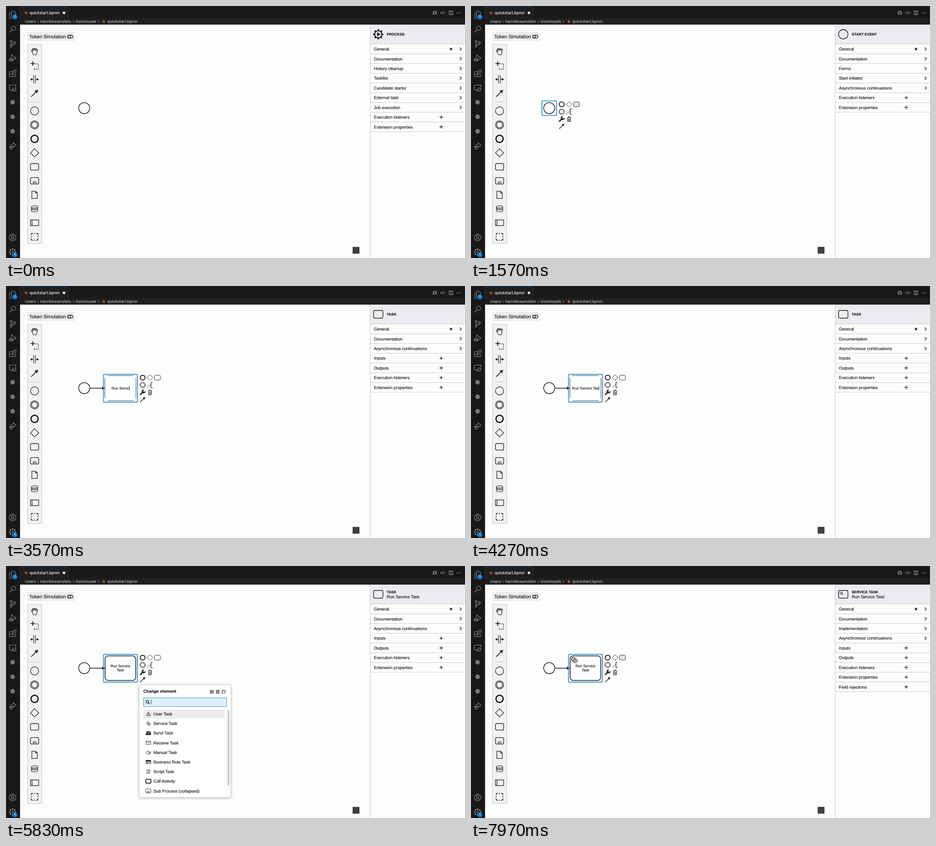
These frames come from a looping animation (1009x555 px, 8000 ms). An HTML page:

```html
<!DOCTYPE html>
<html lang="en">
<head>
<meta charset="utf-8">
<title>Process modeler</title>
<style>
html, body { margin: 0; width: 100%; height: 100%; overflow: hidden; background: #fdfdfb; }
svg { display: block; width: 1009px; height: 555px; }
text { font-family: "Liberation Sans", Arial, sans-serif; white-space: pre; text-rendering: geometricPrecision; }
.code text { font-family: Inter, "Open Sans", sans-serif; }
</style>
</head>
<body>
<svg id="stage" viewBox="0 0 1009 555" xmlns="http://www.w3.org/2000/svg"></svg>
<script>
const INK = '#1b1b1d', BLUE = '#1a86d6', GRAY = '#8a8a8a';
const LOOP = 8000;

// Drawing helpers, all returning SVG markup
const path = (d, w = 1.3, color = INK, fill = 'none', extra = '') =>
  `<path d="${d}" fill="${fill}" stroke="${color}" stroke-width="${w}" ${extra}/>`;
const solid = (d, color = INK) => `<path d="${d}" fill="${color}"/>`;
const circle = (x, y, r, w = 1.3, color = INK, fill = 'none', extra = '') =>
  `<circle cx="${x}" cy="${y}" r="${r}" fill="${fill}" stroke="${color}" stroke-width="${w}" ${extra}/>`;
const dot = (x, y, r, color) => `<circle cx="${x}" cy="${y}" r="${r}" fill="${color}"/>`;
const box = (x, y, w, h, fill, stroke = 'none', sw = 1, r = 0, extra = '') =>
  `<rect x="${x}" y="${y}" width="${w}" height="${h}" rx="${r}" fill="${fill}" stroke="${stroke}" stroke-width="${sw}" ${extra}/>`;
const text = (s, x, cy, size, color = '#111', extra = '') =>
  `<text x="${x}" y="${cy + size * 0.35}" font-size="${size}" fill="${color}" stroke="${color}" stroke-width=".15" ${extra}>${s}</text>`;
const at = (x, y, body, scale = 1) => `<g transform="translate(${x} ${y}) scale(${scale})">${body}</g>`;
const gear = (r, color, w = 1.2) =>
  circle(0, 0, r * 0.72, w, color) +
  circle(0, 0, r * 0.88, r * 0.24, color, 'none',
    `stroke-dasharray="${r * 0.346}" stroke-dashoffset="${r * 0.17}"`);

// Small shapes centred on 0,0
const icon = {
  hand: path('M-4.5 3L-7 -1q-.8-1.7.8-1.5L-4 0-5-5q0-1.6 1.4-1L-2-2-1.8-6.5q.8-1.6 1.8 0L.3-2 1.8-6q1.2-1.1 1.7.3L2.8-1.2 5-4.3q1.4-.8 1.6.7L4.8 3 3.5 7.5h-6z', 1.1),
  lasso: path('M-4-9V1M-9-4H1', 1.8) + path('M-.5 8.5V4M-.5 8.5H8.5V-3.5H2', 1.2, INK, 'none', 'stroke-dasharray="2.6 1.8"'),
  space: path('M-2-9V9M2-9V9', 1.2) + path('M-8 0H-3M8 0H3', 1.5) + solid('M-9.5 0l4-3.2v6.4zM9.5 0l-4-3.2v6.4z'),
  connect: path('M-7.5 7.5L4-4', 1.7) + solid('M8-8L5.6.2-.2-5.6z'),
  start: circle(0, 0, 9, 1.3),
  middle: circle(0, 0, 9, 1.3) + circle(0, 0, 6.6, 1.3),
  end: circle(0, 0, 7.9, 2.8),
  gateway: path('M0-9L9 0 0 9-9 0z'),
  task: box(-9, -7.2, 18, 14.4, 'none', INK, 1.3, 3),
  sub: box(-9, -7.2, 18, 14.4, 'none', INK, 1.3, 3) + path('M-3.2 7V1.8H3.2V7M-1.6 4.5H1.6', 1),
  doc: path('M-6-8H2L6-4V8H-6zM2-8V-4H6'),
  store: path('M-7-4.3V4.3C-7 7.4 7 7.4 7 4.3V-4.3C7-7.4-7-7.4-7-4.3C-7-1.4 7-1.4 7-4.3M-7-1.9C-7 1 7 1 7-1.9M-7 .5C-7 3.4 7 3.4 7 .5', 1.1),
  pool: box(-9, -6.2, 18, 12.4, 'none', INK, 1.3) + path('M-5.5-6V6', 1.3),
  group: path('M-7.5-3.5V-5Q-7.5-7.5-5-7.5H-3.5M3.5-7.5H5Q7.5-7.5 7.5-5V-3.5M7.5 3.5V5Q7.5 7.5 5 7.5H3.5M-3.5 7.5H-5Q-7.5 7.5-7.5 5V3.5M-1.2-7.5H1.2M-1.2 7.5H1.2M-7.5-1.2V1.2M7.5-1.2V1.2', 1.4),
  wrench: path('M-4.8 4.8L1.5-1.5', 2.8, INK, 'none', 'stroke-linecap="round"') +
    path('M2.2-5.5a3.3 3.3 0 1 0 3.3 3.3', 2.2),
  trash: path('M-4-3.2H4M-1.4-3.4V-5H1.4V-3.4M-3.4-3L-3 5.5H3L3.4-3M-1.1-1V4M1.1-1V4', 1.1),
  note: path('M6-6H2.2V6H6', 1.2) + path('M-6 5.5L1.5-1', 1.3, INK, 'none', 'stroke-dasharray="1.6 1.3"'),
  magnifier: circle(-1, -1, 2.9, 1.3) + path('M1.2 1.2L4.3 4.3', 1.6),
  user: circle(0, -2.2, 1.8, .9) + path('M-4 4V1.6Q-3.4 0-1.4 0H1.4Q3.4 0 4 1.6V4zM-2 4V2M2 4V2', .9),
  service: at(-1.2, -1, gear(3.3, INK, .8)) + at(1.4, 1.3, circle(0, 0, 2.7, 1, INK, '#fff') + dot(0, 0, 1, INK)),
  send: solid('M-5.5-3.8H5.5L0 .3zM-5.5-2.6L0 1.6 5.5-2.6V4H-5.5z'),
  receive: path('M-5-3.6H5V3.6H-5zM-5-3.6L0 .7 5-3.6', .9),
  manual: path('M-5-1.2L-1.5-3.5Q.5-3.6-.5-1.6H4.5Q5.4-.6 4.5 0H5Q5.6 1 4.6 1.6 5 2.6 4 3.4H-3.5L-5 2.4zM.5 0H4.5M.5 1.6H4.4', .8),
  rule: path('M-5.2-3.6H5.2V3.6H-5.2zM-5.2 1H5.2M-2-1V3.6', .9) + solid('M-5.6-4H5.6V-1H-5.6z'),
  script: path('M-2-4H4Q1.4-2 3 0T1.8 4H-4Q-1.4 2-3 0T-2-4M-1.5-1.5H1.5M-1 1.6H2', .9),
  call: box(-5.6, -4.4, 11.2, 8.8, 'none', INK, 1.7, 2),
  collapsed: box(-5.6, -4.4, 11.2, 8.8, 'none', INK, .9, 1.6) + path('M-2 4V.8H2V4M-1 2.5H1', .8)
};

function workbench() {
  const line = (d, w = 1.1) => path(d, w, GRAY);
  const badge = y => dot(19.5, y, 5.6, '#0a74cf') +
    text('1', 19.5, y, 7, '#fff', 'text-anchor="middle"');
  const activity =
    at(14.5, 19, line('M-2.5-7.5H3L6.5-4V4H-2.5zM-2.5-3.5H-6.5V8H2.5V4')) + badge(24) +
    at(14.5, 51, circle(2, -2, 4.7, 1.2, GRAY) + line('M-1.5 1.5L-7 7.3', 1.3)) +
    at(14.5, 83, circle(-3.2, -5, 2.1, 1.1, GRAY) + circle(-3.2, 5.4, 2.1, 1.1, GRAY) +
      circle(4, -2, 2.1, 1.1, GRAY) + line('M-3.2-3V3.3M4 .2Q4 2.4 1 2.4H-1Q-3 2.4-3.2 3.4')) +
    at(14.5, 115, line('M-2-2V-7.5L7.5 0-.5 5.2') + circle(-3.5, 3, 3, 1.1, GRAY) + line('M-8 1h2M-8 6l2-1M-1 1h2M-1 5l2 1M-6.5 3h6')) +
    at(14.5, 148, line('M-7-3.5H0V7.5H-7zM0 2H6.5V7.5H0M-7 2H0M2.3-7H7.3V-2H2.3z')) +
    at(14.5, 180, line('M0 4.5H-7V-6H7V-1M-4 7H0') + circle(4, 4, 3.5, 1.1, GRAY) + line('M2.3 4l1.3 1.3L6 2.8', .9)) +
    [212, 244, 276].map(y => dot(14.5, y, 5, '#777')).join('') +
    at(14.5, 308, line('M1-6.8L7.5-1.5 1 3.5V.7Q-4 .5-6.6 4.5-6-3 1-4z') + circle(-3, 5, 2.3, 1.1, GRAY)) +
    at(14.5, 510, circle(0, 0, 7.4, 1.1, GRAY) + circle(0, -2, 2.8, 1.1, GRAY) + line('M-5 5.4Q0-1 5 5.4')) +
    at(14.5, 542, gear(8, GRAY) + circle(0, 0, 2.2, 1, GRAY)) + badge(548);
  const tools = at(942.5, 15, path('M-2.5-2V2.5Q0 5 2.5 2.5V-2zM-2-2.5Q0-5 2-2.5M-4.5-3.5L-2.5-2M4.5-3.5L2.5-2M-5 .8h2.5M5 .8H2.5M-4.5 4L-2.5 2.5M4.5 4L2.5 2.5', .9, '#c4c4c4')) +
    at(960, 15, path('M-2.5-2.5L-5 0-2.5 2.5M2.5-2.5L5 0 2.5 2.5M1-3.5L-1 3.5', .9, '#c4c4c4')) +
    at(978, 15, path('M-4-4H4V4H-4zM0-4V4', .9, '#c4c4c4')) +
    [-3, 0, 3].map(d => dot(995 + d, 15, .8, '#c4c4c4')).join('');
  const crumb = (s, x) => text(s, x, 34, 8.6, '#b0b0b0');
  const arrow = x => path(`M${x - 1.2} 31.5l2.4 2.5-2.4 2.5`, .9, '#b0b0b0');
  return '<g class="code">' +
    box(0, 0, 1009, 41, '#18181a') + box(0, 0, 31, 555, '#18181a') +
    box(31, 26, 978, 15, '#1f1f20') + box(31, 3, 107, 23, '#1f1f20') +
    box(31, 2, 107, 1, '#103f68') + box(30, 3, 1, 552, '#2b2b2b') + box(137.5, 3, .8, 23, '#2b2b2b') +
    activity + tools +
    dot(44, 15, 2.6, '#c8552b') + text('quickstart.bpmn', 52, 14.5, 8.6, '#f2f2f2') + dot(127.5, 15, 2.8, '#f2f2f2') +
    crumb('Users', 42) + arrow(70.5) + crumb('henrikbaumstein', 75.5) + arrow(148) +
    crumb('Downloads', 153) + arrow(203) + dot(215, 34, 2.6, '#c8552b') + crumb('quickstart.bpmn', 223) +
    '</g>';
}

function editor() {
  const tools = ['hand', 'lasso', 'space', 'connect', 'start', 'middle', 'end', 'gateway',
    'task', 'sub', 'doc', 'store', 'pool', 'group'];
  const palette = tools.map((name, i) =>
    at(62.8, i < 4 ? 100 + i * 30.8 : 231 + (i - 4) * 30.8, icon[name])).join('');
  return box(31, 41, 978, 514, '#fdfdfb') +
    box(47, 57, 104.5, 20, '#ebebed') + text('Token Simulation', 51, 67, 10.6) +
    box(135.5, 64.2, 11.2, 6.4, 'none', INK, 1.3, 3.2) + circle(139, 67.4, 3.1, 1.3) +
    box(47.3, 84.3, 31.2, 439, '#f1f1f1', '#bdbdbd', .9) + palette +
    box(51, 211, 24, .9, '#bdbdbd') +
    box(762, 530.5, 15, 15, '#404040') +
    circle(172, 225, 12.2, 1.5, INK, '#fff');
}

const TASK_ROWS = ['General*', 'Documentation', 'Asynchronous continuations',
  'Inputs+', 'Outputs+', 'Execution listeners+', 'Extension properties+'];
const HEAD_TASK = box(-10.3, -8.5, 20.6, 17, 'none', INK, 1.4, 3.2);
const panels = {
  process: {
    title: 'PROCESS',
    head: circle(0, 0, 7.8, 2.2) +
      circle(0, 0, 9.6, 2.8, INK, 'none', 'stroke-dasharray="3.77" stroke-dashoffset="1.9"') + solid('M-2.6-4.6L5 0-2.6 4.6z'),
    rows: ['General*', 'Documentation', 'History cleanup', 'Tasklist', 'Candidate starter',
      'External task', 'Job execution', 'Execution listeners+', 'Extension properties+']
  },
  start: {
    title: 'START EVENT',
    head: circle(0, 0, 10.3, 1.4),
    rows: ['General*', 'Documentation', 'Forms', 'Start initiator', 'Asynchronous continuations',
      'Execution listeners+', 'Extension properties+']
  },
  task: { title: 'TASK', head: HEAD_TASK, rows: TASK_ROWS },
  service: {
    title: 'SERVICE TASK',
    head: HEAD_TASK + at(-4, -2.3, icon.service, .85),
    rows: ['General*', 'Documentation', 'Implementation', 'Asynchronous continuations', 'Inputs+',
      'Outputs+', 'Execution listeners+', 'Extension properties+', 'Field injections+']
  }
};

function panel({ title, head, rows }, name) {
  const list = rows.map((row, i) => {
    const y = 94.8 + i * 21.43;
    const mark = row.endsWith('+') ? path(`M953 ${y}h7.6M956.8 ${y - 3.8}v7.6`, 1.3)
      : path(`M997.6 ${y - 3.4}l3.5 3.4-3.5 3.4`, 1.3);
    return text(row.replace(/[+*]/, ''), 808.7, y, 9.35) + mark +
      (row.endsWith('*') ? dot(978.2, y, 2.7, '#3a3a3a') : '') +
      box(801, y + 10.2, 208, .9, '#c3c3cd');
  }).join('');
  return box(801, 41, 208, 42, '#ebecef') + box(800, 41, .9, 514, '#c3c3c8') +
    box(801, 82.9, 208, .9, '#c3c3cd') + at(818.3, 62.3, head) +
    text(title, 837, name ? 57 : 61.7, 8, '#111', 'font-weight="700"') +
    (name ? text(name, 837, 67.3, 9.3) : '') + list;
}

function contextPad(x, y, hover) {
  const cells = [['end', 0, 0, .68], ['gateway', 1, 0, .7], ['task', 2, 0, .72],
    ['middle', 0, 1, .68], ['note', 1, 1, 1], ['wrench', 0, 2, 1], ['trash', 1, 2, 1], ['connect', 0, 3, .72]];
  return (hover ? box(x + 26, y - 5, 12.8, 10.2, '#e4e4e4', 'none', 0, 2) : '') +
    cells.map(([name, col, row, k]) => at(x + col * 16.2, y + row * 16.2, icon[name], k)).join('');
}

const outline = (x, y, w, h) => box(x, y, w, h, 'none', BLUE, 1.7, 2);

function taskShape(s) {
  const label = (str, y) => text(str, 251.6, y, 8.04, '#111', 'text-anchor="middle"');
  let out = path('M184.5 225H212', 1.5) + solid('M218 225l-7-3.6v7.2z') +
    box(217.9, 198, 67.4, 54, '#fff', INK, 1.6, 6.7);
  if (s.editing) {
    out += box(217.9, 198, 67.4, 54, '#fff');
    const width = measure(s.typed);
    const wrapped = s.typed.length > 15;
    if (wrapped) out += label('Run Service', 220) + label('Task', 229.8);
    else out += text(s.typed, 251.6 - width / 2, 225, 8.04);
    if (s.caret) {
      const x = 251.6 + (wrapped ? measure('Task') : width) / 2;
      out += box(x, wrapped ? 225.2 : 220.3, .8, 9.4, '#111');
    }
  } else {
    out += label('Run Service', 219.7) + label('Task', 229.6);
  }
  if (s.panel === 'service') out += at(226.8, 207, icon.service, 1.5);
  return out + outline(214.3, 194.7, 74.6, 61) + contextPad(300.4, 201.8, s.hover);
}

const MENU = [['User Task', 'user'], ['Service Task', 'service'], ['Send Task', 'send'],
  ['Receive Task', 'receive'], ['Manual Task', 'manual'], ['Business Rule Task', 'rule'],
  ['Script Task', 'script'], ['Call Activity', 'call'], ['Sub Process (collapsed)', 'collapsed']];

function menu(s) {
  const rows = MENU.map(([name, key], i) => {
    const y = 325.8 + i * 21.18;
    return (i === s.row ? box(302, y - 9.8, 179, 19.6, '#ececef') : '') +
      at(313, y, icon[key]) + text(name, 324, y, 9.35);
  }).join('');
  return box(293, 262, 201, 247.5, '#fff', '#d6d6d6', .7, 1.5,
      'style="filter:drop-shadow(0 1px 3px rgba(0,0,0,.3))"') +
    text('Change element', 302, 276.2, 9.35, '#111', 'font-weight="700"') +
    path('M449.5 273v8M452.4 273v8M455.3 273v8M461.3 274h8M461.3 277h8M461.3 280h8', 1.5) +
    path('M476.3 279.6A3.5 3.5 0 1 1 479.5 280.4', 1.1) + solid('M474.3 278l1.2 3.4 2.5-2.3z') +
    box(302.5, 290.5, 182.5, 19, s.focus ? '#dcf1fa' : '#fff', s.focus ? '#3b93b8' : '#b8b8bc', 1) +
    at(311.5, 299.8, icon.magnifier) +
    (s.focus && s.caret ? box(319.2, 294.8, .8, 9.6, '#111') : '') + rows +
    box(487.2, 316.5, 3.8, 167.5, '#c4c4c6', 'none', 0, 1.9);
}

// What happens when, in ms
const CUES = [
  [0, { panel: 'process' }],
  [800, { panel: 'start' }],
  [1430, { hover: true }],
  [2000, { panel: 'task', hover: false, editing: true }],
  [4830, { editing: false, name: 'Run Service Task' }],
  [5400, { menu: true, focus: true, row: 0 }],
  [6350, { row: 1 }],
  [6670, { focus: false }],
  [6800, { menu: false, panel: 'service' }],
  [7700, { hover: true }]
];
const LABEL = 'Run Service Task', TYPE_FROM = 2330, KEY_GAP = 137;
const TYPE_END = TYPE_FROM + (LABEL.length - 1) * KEY_GAP;

function stateAt(t) {
  const s = Object.assign({}, ...CUES.filter(([from]) => from <= t).map(c => c[1]));
  const keys = Math.floor((t - TYPE_FROM) / KEY_GAP) + 1;
  s.typed = LABEL.slice(0, Math.max(0, Math.min(LABEL.length, keys)));
  const since = s.menu ? t - 5400 : Math.max(0, t - TYPE_END);
  s.caret = since % 1000 < 500;
  return s;
}

const pen = document.createElement('canvas').getContext('2d');
pen.font = '80.4px "Liberation Sans", Arial, sans-serif';
const measure = str => pen.measureText(str).width / 10;

const stage = document.getElementById('stage');
stage.innerHTML = editor() + workbench() + '<g id="live"></g>';
const live = document.getElementById('live');
let shown = '';

function draw(now) {
  const s = stateAt(now % LOOP);
  const key = JSON.stringify(s);
  if (key !== shown) {
    shown = key;
    const start = s.panel === 'start'
      ? outline(155.8, 209, 32.2, 32) + contextPad(199.4, 216.5, s.hover) : '';
    const task = s.panel === 'task' || s.panel === 'service' ? taskShape(s) : '';
    live.innerHTML = panel(panels[s.panel], s.name) + start + task + (s.menu ? menu(s) : '');
  }
  requestAnimationFrame(draw);
}
draw(performance.now());
</script>
</body>
</html>
```
